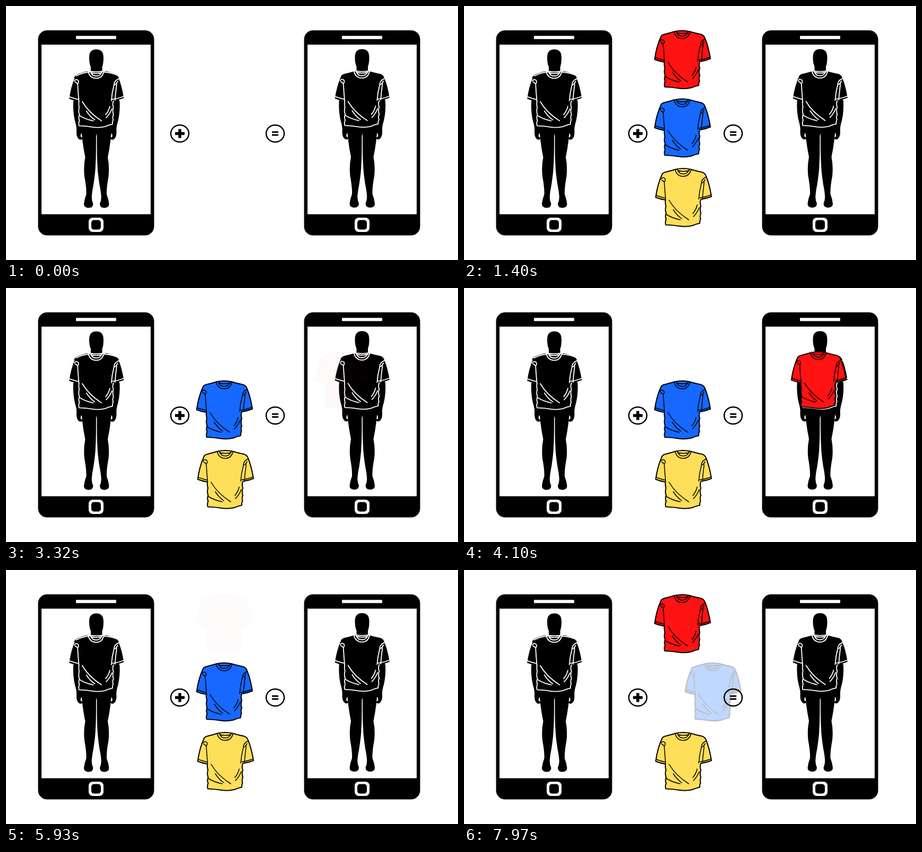
Write an HTML page that moves like this. It is 853 px wide and 480 px high and loops after 8 s.

```html
<!DOCTYPE html>
<html lang="en">
<head>
<meta charset="utf-8">
<title>Virtual try-on</title>
<style>
html, body { margin: 0; width: 100%; height: 100%; overflow: hidden; background: #fff; }
svg { display: block; width: 100%; height: 100%; }
.line { fill: none; stroke: #000; stroke-width: 1.5; stroke-linecap: round; stroke-linejoin: round; }
.white { stroke: #fff; stroke-width: 1.9; }
.edge { stroke: #000; stroke-width: 2; stroke-linejoin: round; }
.red, .blue, .yellow, .worn { animation: 8s linear infinite; }
.red { animation-name: redFade, redMove; }
.blue { animation-name: blueFade, blueMove; }
.yellow { animation-name: yellowFade, yellowMove; }
.worn { animation-name: wornFade, wornMove; }

@keyframes redFade {
  0%, 6% { opacity: 0; }
  16%, 20.2% { opacity: 1; }
  32.5%, 74% { opacity: 0; }
  84%, 100% { opacity: 1; }
}
@keyframes redMove {
  0%, 6% { transform: translateX(-56px); animation-timing-function: cubic-bezier(.333,.667,.667,1); }
  16%, 22.5% { transform: translateX(0); }
  32.5% { transform: translateX(80px); }
  32.51%, 100% { transform: translateX(0); }
}
@keyframes blueFade {
  0%, 6% { opacity: 0; }
  16%, 90.2% { opacity: 1; }
  100% { opacity: .24; }
}
@keyframes blueMove {
  0%, 6% { transform: translateX(-56px); animation-timing-function: cubic-bezier(.333,.667,.667,1); }
  16%, 92.43% { transform: translateX(0); }
  100% { transform: translateX(60.5px); }
}
@keyframes yellowFade {
  0%, 6% { opacity: 0; }
  16%, 100% { opacity: 1; }
}
@keyframes yellowMove {
  0%, 6% { transform: translateX(-56px); animation-timing-function: cubic-bezier(.333,.667,.667,1); }
  16%, 100% { transform: translateX(0); }
}
@keyframes wornFade {
  0%, 41.25% { opacity: 0; }
  51.25%, 57.75% { opacity: 1; }
  67.9%, 100% { opacity: 0; }
}
@keyframes wornMove {
  0%, 41.25% { transform: translateX(-36px); animation-timing-function: cubic-bezier(.333,.667,.667,1); }
  51.25% { transform: translateX(0); }
  57.75% { transform: translateX(0); animation-timing-function: cubic-bezier(.333,0,.667,.333); }
  67.9%, 100% { transform: translateX(-34px); }
}
</style>
</head>
<body>
<svg viewBox="0 0 853 480">
  <defs>
    <path id="cut" d="M39 2.500Q53 -.5 66 2.500Q78 6 88 8Q94 9.500 96 16Q102 30 106 54Q97 58 86 59.500Q83.500 66 86 72Q83.500 79 86 86Q83.500 91 85.500 96Q83.500 100 84 104.500Q77 106 70 109Q58 112 46 110Q34 108 20 107.500Q18 103 20.500 97Q18 92 20.500 86Q18 80 20 72Q18.500 66 19 60.500Q9 59 .8 55.500Q4 32 12 14Q13 9.500 19 8Q29 5.500 39 2.500Z"/>
    <g id="seams">
      <path d="M11 21Q14 16 18 20Q20 23 17 27Q18 44 19.500 60M12 23Q15 24 17 27M96 17Q87 21 87 29Q83 44 82 59M94 22Q91 25 92 29Q90 44 89 58M87 29Q91 28 94 22M2 52Q10 55 19 57M84 56.500Q96 55 105 51"/>
      <path d="M37.500 3.500Q41 16 53 16Q64 16 67.500 3.500M42 3Q44 11.500 53 11.500Q61 11.500 64 3M42 5Q53 8 64 5"/>
      <path d="M26 61Q38 82 63 98M34 79Q41 90 50 96M83 75Q79 85 72 92M21 88Q32 95 47 98M79 70Q77 79 71 86"/>
    </g>
    <g id="shirt">
      <use href="#cut" class="edge"/>
      <use href="#seams" class="line"/>
    </g>
    <g id="phone">
      <rect x="60.500" y="46" width="219" height="387.500" rx="17"/>
      <g fill="#fff">
        <rect x="67" y="73" width="206" height="320.500"/>
        <rect x="132" y="56.500" width="76" height="6" rx="1"/>
        <rect x="156" y="400" width="28" height="27" rx="7.500"/>
      </g>
      <rect x="161" y="404.500" width="18" height="18" rx="5"/>
    </g>
    <g id="half">
      <path d="M132 170L127 180Q126 200 130 217Q134 229 133 239Q133 248 138 252Q143 254 145 250L141 247Q140 243 143 240Q145 246 148 247Q152 243 151 234L148 180Z"/>
      <path d="M142 226Q143 254 149.500 286Q146 303 148 322Q152 343 151.500 356Q148 365 147 374Q147 381 155 381.500Q164 382 164.500 374Q161 366 162 358Q162.500 350 165 338Q169 312 169 299Q170 290 170 246L171 240V226Z"/>
    </g>
    <g id="body">
      <path d="M170.500 82C180 82 184 87 184 98Q184 109 181.500 115V124Q188 127 200 130V140H141V130Q154 127 160 124V115Q157 109 157 98C157 87 161 82 170.500 82Z"/>
      <use href="#half"/>
      <use href="#half" transform="matrix(-1 0 0 1 341.500 0)"/>
      <g transform="translate(118.500 121) scale(.98)">
        <use href="#cut"/>
        <use href="#seams" class="line white"/>
        <path class="line white" d="M19.500 60Q18.500 66 20 72Q18 80 20.500 86Q18 92 20.500 97Q18 103 20 107.500Q34 108 46 110Q58 112 70 109Q77 106 84 104.500Q83.500 100 85.500 96Q83.500 91 86 86Q83.500 79 86 72Q83.500 66 86 59.500M37 2Q53 5 69 2"/>
      </g>
    </g>
  </defs>

  <rect width="853" height="480" fill="#fff"/>
  <use href="#phone"/>
  <use href="#phone" x="502"/>
  <path d="M128 136Q132 127 156 123H186Q209 126 213 136Z"/>
  <use href="#body"/>
  <path class="line white" d="M133 132Q143 126 157 125M186 125Q201 126 211 131"/>
  <use href="#body" x="501.500" y="-.5"/>

  <g class="worn"><use href="#shirt" fill="#ff1212" transform="translate(617 119.500) scale(.98)"/></g>
  <g class="red"><use href="#shirt" x="359" y="45.500" fill="#ff1212"/></g>
  <g class="blue"><use href="#shirt" x="359" y="174.500" fill="#1668ff"/></g>
  <g class="yellow"><use href="#shirt" x="361" y="306" fill="#ffde59"/></g>

  <g fill="none" stroke="#000" stroke-width="2.500">
    <ellipse cx="328" cy="241" rx="17" ry="16"/>
    <ellipse cx="508" cy="241" rx="17" ry="16"/>
    <path stroke-width="5.500" d="M319 241H337M328 232.500V249.500"/>
    <path stroke-width="3" d="M502 238.200H514M502 243.800H514"/>
  </g>
</svg>
</body>
</html>
```
